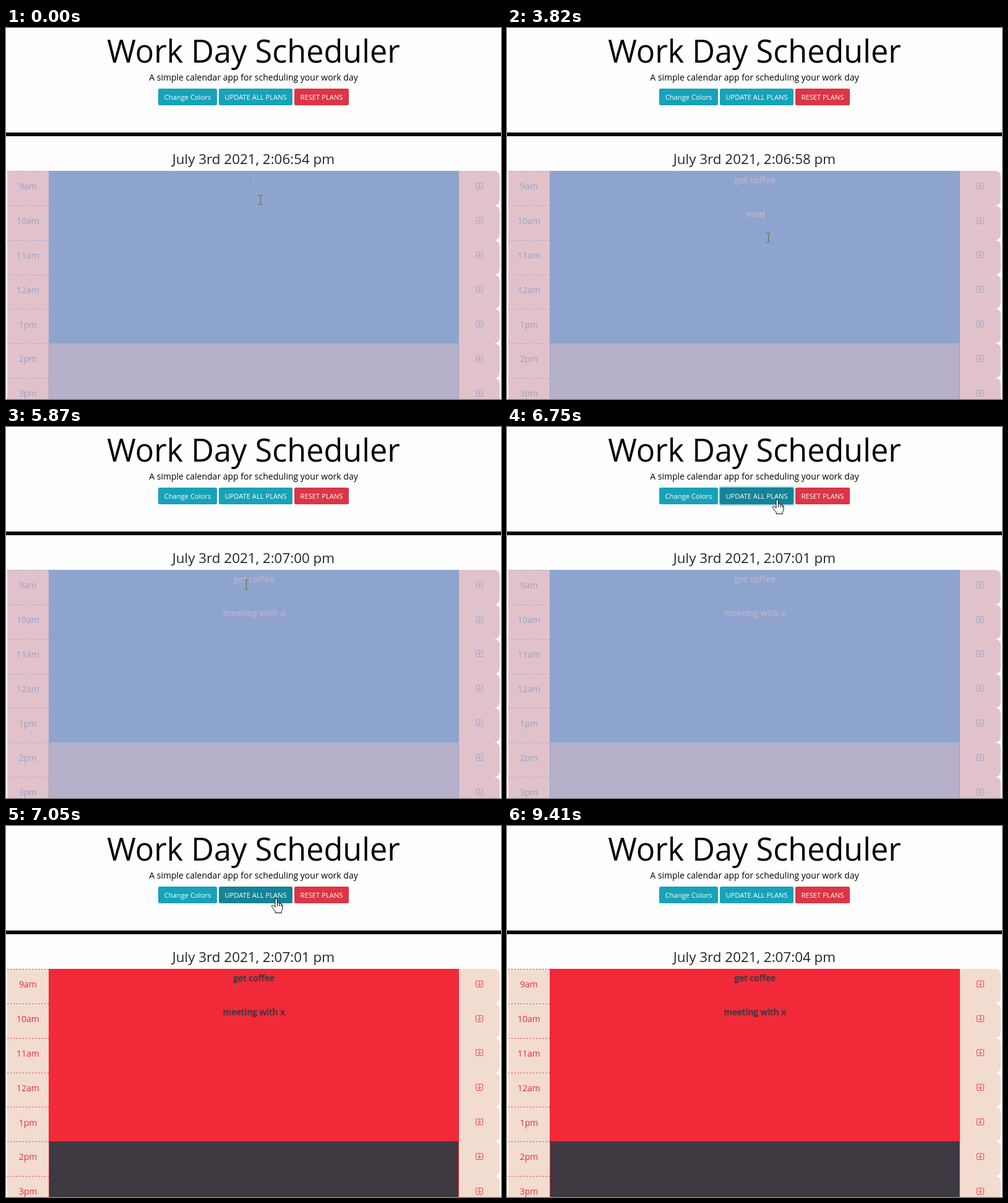
These frames come from a looping animation (800x600 px, 9720 ms). An HTML page:

```html
<!DOCTYPE html>
<html lang="en">
<head>
<meta charset="utf-8">
<title>Work Day Scheduler</title>
<style>
html, body { margin: 0; width: 100%; height: 100%; overflow: hidden; background: #fefefe; }
svg { display: block; width: 800px; height: 600px; font-family: "Open Sans", sans-serif; isolation: isolate; }
text { text-anchor: middle; white-space: pre; }
#plan { --side: #e2c2ca; --past: #8da4cf; --now: #b6b0ca; }
#plan.red { --side: #f2dccf; --past: #f22938; --now: #3e3840; }
.side { fill: var(--side); }
.past { fill: var(--past); }
.now { fill: var(--now); }
.line { stroke: var(--past); fill: none; }
.icon { stroke-width: .9; stroke-linecap: round; }
.note { font-size: 14px; font-weight: 600; stroke: var(--now); stroke-width: .35; }
.btn text { font-size: 11.2px; fill: #fff; }
#beam { mix-blend-mode: difference; stroke: #fff; fill: none; }
.pointer { fill: #fff; stroke: #000; stroke-linejoin: round; }
</style>
</head>
<body>
<svg viewBox="0 0 800 600">
  <rect width="800" height="600" fill="#fefefe"/>
  <text x="400" y="56" font-size="50.4">Work Day Scheduler</text>
  <text x="400" y="85" font-size="14">A simple calendar app for scheduling your work day</text>
  <rect id="ring" x="342" y="96" width="123" height="31" rx="4" fill="#3ab0c3" fill-opacity=".5"/>
  <g class="btn">
    <rect x="246" y="98" width="95" height="27" rx="2.5" fill="#17a2b8"/>
    <rect id="update" x="344" y="98" width="119" height="27" rx="2.5" fill="#17a2b8"/>
    <rect x="466" y="98" width="88" height="27" rx="2.5" fill="#dc3545"/>
    <text x="293.5" y="116">Change Colors</text>
    <text x="403.5" y="116">UPDATE ALL PLANS</text>
    <text x="510" y="116">RESET PLANS</text>
  </g>
  <rect y="169" width="800" height="6"/>
  <g id="plan">
    <text id="clock" x="400" y="220" font-size="22.4" fill="#212529"></text>
    <rect class="past" x="69" y="231" width="663" height="369"/>
    <rect class="now" x="70" y="510" width="661" height="90"/>
    <g id="rows"></g>
    <text class="note now" x="400.7" y="251"></text>
    <text class="note now" x="400.7" y="306"></text>
    <rect id="caret" class="now" width="1" height="19"/>
  </g>
  <path id="beam" d="M-3 -7.5h2.5M1 -7.5h2.5M.5 -7v14M-3 7.5h2.5M1 7.5h2.5"/>
  <path id="arrow" class="pointer" d="M.5 .5v15.5l3.6-3.4 2.5 5.8 2.4-1-2.5-5.7h5z"/>
  <g id="hand" class="pointer">
    <path d="M-2 1.5Q-2-.5-.2-.5Q1.6-.5 1.6 1.5V7Q2.2 5.8 3.6 6.1Q5 6.4 5 7.8Q6 6.8 7.2 7.3Q8.2 7.8 8.2 9Q10 8.4 10 10.5V15Q10 17.5 8.3 19.5V22.5H-1.8V20Q-4.5 17-7.3 12.7Q-8.2 11-7 10.3Q-5.5 9.6-3.8 11.5L-2 13.2z"/>
    <path d="M1.6 7v5M5 8v4M8.2 9.2v3" fill="none"/>
  </g>
</svg>
<script>
const LOOP = 9720, ROW = 55.85, KEY = 120, TICK = 938, STEP = 60;
const $ = id => document.getElementById(id);
const notes = document.querySelectorAll('.note');

const lines = [{ str: 'get coffee', start: 490 }, { str: 'meeting with x', start: 3580 }];
const refocus = 2780, press = 6510, reload = 6930, ready = 7050, leave = 7910;
const caretOff = [120, 1750, 3280, 5380];

// Each move is a quadratic curve: start, bend, end
const rest = [411, 278], low = [422, 338.5], button = [437, 118];
const moves = [
  { from: 2240, to: 2600, path: [rest, [388, 306], low] },
  { from: 5630, to: press, path: [low, [333, 169.5], button] },
  { from: 7610, to: leave, path: [button, [465, 200], [570, 595]] }
];

function buildRows() {
  $('rows').innerHTML = ['9am', '10am', '11am', '12am', '1pm', '2pm', '3pm'].map((hour, i) => {
    const y = Math.round(231 + i * ROW), h = Math.round(231 + (i + 1) * ROW) - y;
    const base = Math.round(261.2 + i * ROW), mid = Math.floor(255.2 + i * ROW);
    return `<rect class="side" x="2" y="${y}" width="67" height="${h}"/>
      <path class="line" d="M2 ${y + .5}h67" stroke-dasharray="2 3"/>
      <text class="past" x="35.5" y="${base}" font-size="14">${hour}</text>
      <path class="side" d="M732 ${y}h56q10 0 10 10v${h - 20}q0 10-10 10h-56z"/>
      <path class="line icon" d="M763 ${mid - 4.5}h-2q-1.5 0-1.5 1.5v7q0 1.5 1.5 1.5h8q1.5 0 1.5-1.5v-7q0-1.5-1.5-1.5h-2
        M765 ${mid - 5.5}v8.5m-2.5-2.5l2.5 2.5 2.5-2.5"/>`;
  }).join('');
}

const clamp = (v, lo, hi) => Math.min(hi, Math.max(lo, v));
const show = (el, on) => el.style.display = on ? '' : 'none';
const pad = n => String(n).padStart(2, '0');

function pointerAt(t) {
  const { from, to, path: [a, b, c] } = moves.findLast(m => t >= m.from) || moves[0];
  const u = clamp(Math.floor((t - from) / STEP) * STEP / (to - from), 0, 1), v = 1 - u;
  return a.map((p, i) => Math.round(v * v * p + 2 * u * v * b[i] + u * u * c[i]));
}

function drawCaret(t) {
  const on = t < press && !caretOff.some(s => t >= s && t < s + 350);
  show($('caret'), on);
  if (!on) return;
  const line = t < refocus ? 0 : 1;
  $('caret').setAttribute('x', Math.floor(400.5 + notes[line].getComputedTextLength() / 2));
  $('caret').setAttribute('y', 236 + 55 * line);
}

function draw(t) {
  const blank = t >= reload && t < ready;
  show($('plan'), !blank);
  $('plan').classList.toggle('red', t >= ready);

  const s = 54 + Math.floor((t + 130) / TICK);
  $('clock').textContent = `July 3rd 2021, 2:${pad(6 + Math.floor(s / 60))}:${pad(s % 60)} pm`;

  lines.forEach(({ str, start }, i) => {
    notes[i].textContent = str.slice(0, Math.max(0, Math.floor((t - start) / KEY) + 1));
  });
  drawCaret(t);

  const [x, y] = pointerAt(t);
  const over = x >= 344 && x < 463 && y >= 98 && y < 125;
  const kind = over ? 'hand' : y > 197 ? 'beam' : 'arrow';
  for (const id of ['beam', 'arrow', 'hand']) {
    show($(id), id === kind && t < leave);
    $(id).setAttribute('transform', `translate(${x} ${y})`);
  }
  $('update').setAttribute('fill', over && !blank ? '#138496' : '#17a2b8');
  show($('ring'), t >= press && t < reload);
}

buildRows();
const start = performance.now();
function frame() {
  draw((performance.now() - start) % LOOP);
  requestAnimationFrame(frame);
}
frame();
</script>
</body>
</html>
```
